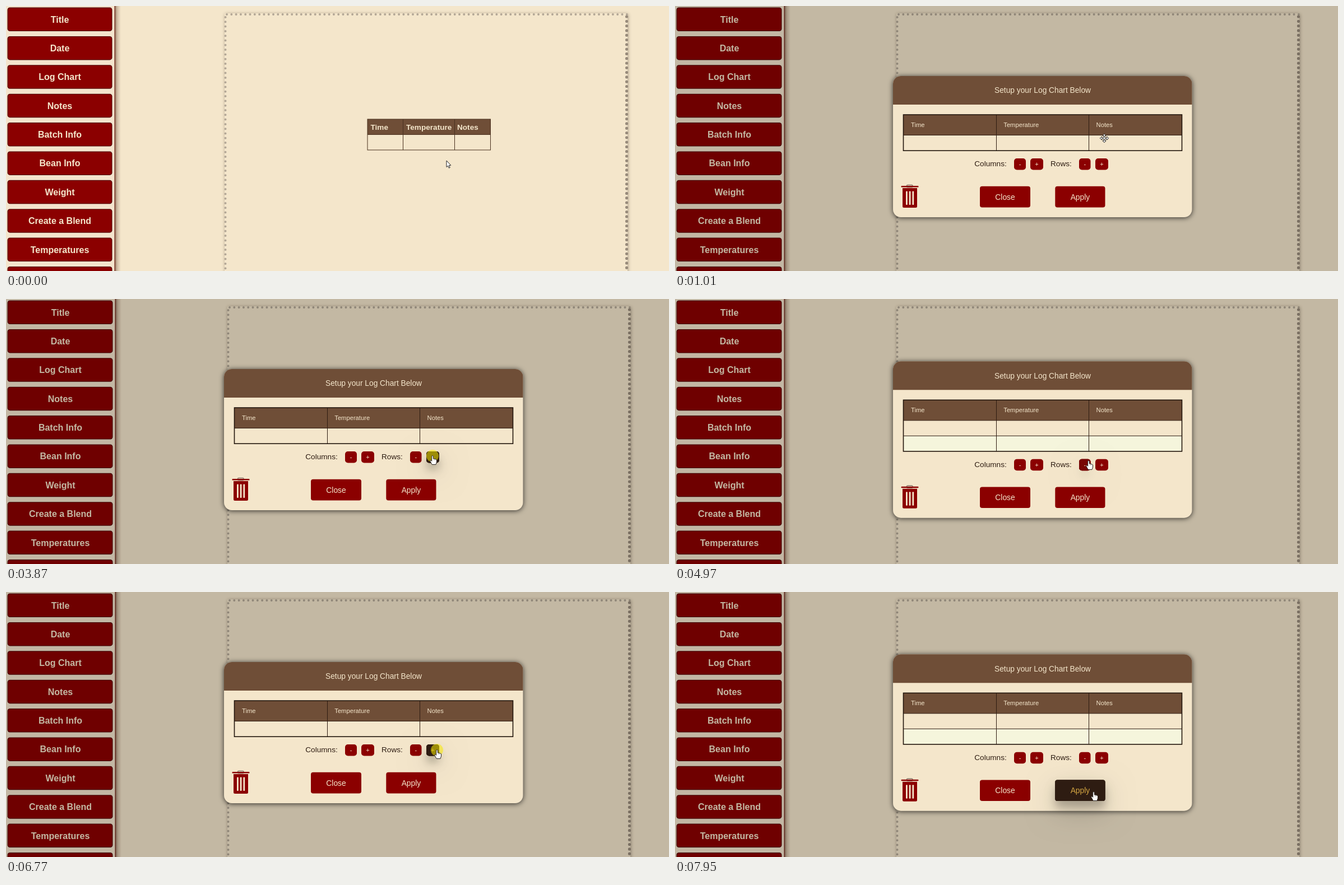
Recreate the animation shown at these times as an HTML page with a canvas. Size 1183 by 473 pixels, loop 8000 ms.

```html
<!DOCTYPE html>
<html lang="en">
<head>
<meta charset="utf-8">
<title>Log chart setup</title>
<style>
  html, body { margin: 0; width: 100%; height: 100%; overflow: hidden; background: #f4e6cb; }
  canvas { display: block; width: 1183px; height: 473px; }
</style>
</head>
<body>
<canvas id="stage" width="1183" height="473"></canvas>
<script>
const ctx = document.getElementById('stage').getContext('2d');
const W = 1183, H = 473, LOOP = 8000;
const CREAM = '#f4e6cb', COFFEE = '#6f4e37', RED = '#8b0000', DARK = '#2e1c12';
const FONT = '"Liberation Sans", Arial, sans-serif';
const MENU = ['Title', 'Date', 'Log Chart', 'Notes', 'Batch Info', 'Bean Info',
  'Weight', 'Create a Blend', 'Temperatures', ''];
const COLUMNS = ['Time', 'Temperature', 'Notes'];

// Pointer path: time, x, y
const PATH = [
  [0, 786, 276], [70, 786, 276], [280, 766, 236], [1740, 766, 236],
  [2150, 658, 280], [2360, 652, 282], [2570, 652, 282], [3260, 759, 282],
  [3540, 761, 280], [4620, 761, 280], [4970, 738, 289], [5320, 733, 290],
  [5740, 733, 290], [6200, 769, 282], [7200, 769, 282], [7600, 748, 354],
  [7700, 747, 357]
];
const HOVERS = {
  colPlus: [[1990, 2720]],
  rowMinus: [[2990, 3100], [4850, 5860]],
  rowPlus: [[3190, 4010], [5980, 6910]],
  apply: [[7480, 9000]]
};
const CLICKS = [[740, 880], [3870, 4080], [5460, 5670], [6770, 6980]];
const TWO_ROWS = [[4010, 5600], [6910, 8000]];

const clamp = v => Math.max(0, Math.min(1, v));
const smooth = v => { v = clamp(v); return v * v * (3 - 2 * v); };
const mix = (a, b, p) => `rgb(${a.map((v, i) => Math.round(v + (b[i] - v) * p))})`;
const within = (spans, t) => spans.some(([a, b]) => t >= a && t < b);

function hoverLevel(id, t) {
  return (HOVERS[id] || []).reduce((sum, [on, off]) =>
    sum + smooth((Math.min(t, off) - on) / 400) * (1 - smooth((t - off) / 400)), 0);
}

function pointerAt(t) {
  const i = PATH.findIndex(k => k[0] > t);
  if (i < 0) return PATH[PATH.length - 1].slice(1);
  const [t0, x0, y0] = PATH[i - 1], [t1, x1, y1] = PATH[i];
  const p = smooth((t - t0) / (t1 - t0));
  return [x0 + (x1 - x0) * p, y0 + (y1 - y0) * p];
}

function box(x, y, w, h, r, color) {
  ctx.beginPath();
  ctx.roundRect(x, y, w, h, r);
  ctx.fillStyle = color;
  ctx.fill();
}

function shadowBox(x, y, w, h, r, color, shade, blur, dx, dy) {
  ctx.save();
  ctx.shadowColor = shade;
  ctx.shadowBlur = blur;
  ctx.shadowOffsetX = dx;
  ctx.shadowOffsetY = dy;
  box(x, y, w, h, r, color);
  ctx.restore();
}

function rect(x, y, w, h, color) {
  ctx.fillStyle = color;
  ctx.fillRect(x, y, w, h);
}

function text(str, x, y, size, color, align = 'left', weight = '') {
  ctx.font = `${weight} ${size}px ${FONT}`;
  ctx.textAlign = align;
  ctx.fillStyle = color;
  ctx.fillText(str, x, y);
}

function dots(x0, y0, dx, dy, count, r, color) {
  ctx.fillStyle = color;
  ctx.beginPath();
  for (let i = 0; i < count; i++) {
    const x = x0 + dx * i, y = y0 + dy * i;
    ctx.moveTo(x + r, y);
    ctx.arc(x, y, r, 0, 7);
  }
  ctx.fill();
}

function drawPaper(dx) {
  ctx.save();
  ctx.translate(dx, 0);
  shadowBox(390, 13, 719, 520, 2, CREAM, 'rgba(60,45,30,.4)', 6, 1, 1);
  dots(394, 15, 8.3, 0, 87, 2, '#b3a796');
  dots(391.5, 20, 0, 8.3, 56, 2, '#b3a796');
  dots(1107.5, 19, 0, 8.3, 56, 2.6, '#988b7b');

  const edges = [645, 708.5, 800.5, 864.5];
  rect(645, 202, 219.5, 27.5, COFFEE);
  ctx.strokeStyle = '#49301f';
  ctx.lineWidth = 1;
  ctx.strokeRect(645, 202, 219.5, 55);
  rect(645, 229, 219, 1, '#49301f');
  edges.slice(1, 3).forEach(x => rect(x - .5, 202, 1, 55, '#49301f'));
  COLUMNS.forEach((name, i) =>
    text(name, [650.5, 714, 805][i], 220.5, 13.6, CREAM, 'left', 'bold'));
  ctx.restore();
}

function drawMenu(dx) {
  const edge = 194 + dx;
  const shade = ctx.createLinearGradient(edge, 0, edge + 11, 0);
  shade.addColorStop(0, 'rgba(75,30,15,.6)');
  shade.addColorStop(.4, 'rgba(75,30,15,.22)');
  shade.addColorStop(1, 'rgba(75,30,15,0)');
  rect(edge, 0, 11, H, shade);
  rect(0, 0, edge, H, '#f4e4cd');
  rect(edge - .5, 0, 1.2, H, '#6e2115');
  MENU.forEach((name, i) => {
    const y = 3 + i * 51.375;
    box(2.5, y - .5, 187 + dx, 42.5, 4.5, '#4a0606');
    box(3.5, y + .5, 185 + dx, 40.5, 4, RED);
    text(name, 96 + dx, y + 26.6, 16, CREAM, 'center', 'bold');
  });
}

function button(label, x, y, w, h, r, size, p) {
  const fill = mix([139, 0, 0], [46, 28, 18], p);
  if (p > 0) {
    shadowBox(x, y, w, h, r, fill, `rgba(0,0,0,${.19 * p})`, 50, 0, 17);
    shadowBox(x, y, w, h, r, fill, `rgba(0,0,0,${.24 * p})`, 16, 0, 12);
  }
  box(x, y, w, h, r, fill);
  text(label, x + w / 2, y + h / 2 + size * .36, size, mix([244, 230, 203], [212, 166, 66], p), 'center');
}

function drawBin(y) {
  ctx.strokeStyle = '#86766a';
  ctx.lineWidth = 1.5;
  ctx.beginPath();
  ctx.roundRect(413.5, y + .5, 10.5, 4, 1.5);
  ctx.stroke();
  box(403.5, y + 2, 31, 2.6, 1.2, RED);
  box(406, y + 6, 26, 35, [0, 0, 2.5, 2.5], RED);
  [412, 417.7, 423.4].forEach(x => box(x, y + 11.5, 2.8, 24.5, 1, CREAM));
}

function drawModal(t) {
  const extra = within(TWO_ROWS, t) ? 27.4 : 0;
  const top = 125 - extra / 2, height = 252 + extra, foot = extra;
  ctx.save();
  ctx.translate(0, top - 125);
  shadowBox(389, 125, 533.5, height, 14, CREAM, 'rgba(0,0,0,.75)', 10, 0, 1);
  box(389, 125, 533.5, 51, [14, 14, 0, 0], COFFEE);
  text('Setup your Log Chart Below', 656, 155.3, 13.75, CREAM, 'center');

  rect(407, 194, 498, 36.5, COFFEE);
  if (extra) rect(407, 258, 498, 27.4, '#f5f5dc');
  rect(407, 230, 498, 1, DARK);
  if (extra) rect(407, 257.5, 498, 1, DARK);
  [573, 738].forEach(x => rect(x, 194, 1, 64.5 + extra, DARK));
  ctx.strokeStyle = '#22160d';
  ctx.lineWidth = 1.6;
  ctx.strokeRect(407.5, 194, 497, 64.2 + extra);
  COLUMNS.forEach((name, i) => text(name, 421 + i * 165.3, 215.6, 11.2, CREAM));

  const y = 272 + foot;
  text('Columns:', 534.3, y + 14.3, 13.6, DARK);
  text('Rows:', 670, y + 14.3, 13.6, DARK);
  const controls = [
    ['-', 605, y, 21, 20.5, 5, 11, 'colMinus'],
    ['+', 634, y, 23, 20.5, 5, 11, 'colPlus'],
    ['-', 721, y, 20.5, 20.5, 5, 11, 'rowMinus'],
    ['+', 750, y, 23, 20.5, 5, 11, 'rowPlus'],
    ['Close', 544, y + 49.8, 90, 37.6, 4, 13.8, 'close'],
    ['Apply', 678.3, y + 49.8, 89.2, 37.6, 4, 13.8, 'apply']
  ].map(c => [...c.slice(0, 7), hoverLevel(c[7], t)]);
  controls.sort((a, b) => a[7] - b[7]).forEach(c => button(...c));
  drawBin(319 + foot);
  ctx.restore();
}

function outline(points, fill, stroke) {
  ctx.beginPath();
  points.forEach(([x, y], i) => i ? ctx.lineTo(x, y) : ctx.moveTo(x, y));
  ctx.closePath();
  ctx.lineWidth = 1;
  ctx.lineJoin = 'round';
  ctx.fillStyle = fill;
  ctx.strokeStyle = stroke;
  ctx.fill();
  ctx.stroke();
}

function drawArrow() {
  outline([[0, 0], [0, 11.5], [2.6, 9.2], [4.3, 13.2], [6.2, 12.4], [4.5, 8.5], [7.8, 8.3]], '#fff', '#222');
}

function drawHand() {
  outline([[-1.3, .3], [0, -.4], [1.3, .3], [1.4, 5], [3.6, 5.2], [5.6, 5.8], [7.5, 7],
    [7.5, 11], [6, 15.5], [-.8, 15.5], [-4.3, 9.2], [-3.9, 7.8], [-2.6, 8], [-1.3, 9.4]], '#fff', '#2b2420');
  [2.5, 4.5].forEach(x => rect(x, 5.6, .6, 2.4, '#6b625a'));
}

function drawMove() {
  const arm = [[-1, -1], [-1, -4.5], [-3, -4.5], [0, -7.8], [3, -4.5], [1, -4.5]];
  const cross = [];
  for (let k = 0; k < 4; k++) {
    for (const [x, y] of arm) {
      const c = [1, 0, -1, 0][k], s = [0, 1, 0, -1][k];
      cross.push([x * c - y * s, x * s + y * c]);
    }
  }
  outline(cross, '#fff', '#222');
}

function drawPointer(t) {
  const [x, y] = pointerAt(t);
  if (within(CLICKS, t)) {
    ctx.fillStyle = 'rgba(250,235,0,.55)';
    ctx.beginPath();
    ctx.arc(x, y, 11, 0, 7);
    ctx.fill();
  }
  ctx.save();
  ctx.translate(x, y);
  if (t >= 180 && t < 1770) drawMove();
  else if (Object.values(HOVERS).some(spans => within(spans, t))) drawHand();
  else drawArrow();
  ctx.restore();
}

function draw(t) {
  const open = t >= 810, fade = open ? clamp((t - 740) / 250) : 0;
  rect(0, 0, W, H, CREAM);
  drawPaper(open ? 5 : 0);
  drawMenu(open ? 1 : 0);
  if (open) {
    ctx.globalAlpha = fade;
    rect(0, 0, W, H, 'rgba(0,0,0,.2)');
    drawModal(t);
    ctx.globalAlpha = 1;
  }
  drawPointer(t);
}

const start = performance.now();
function tick() {
  draw((performance.now() - start) % LOOP);
  requestAnimationFrame(tick);
}
tick();
</script>
</body>
</html>
```
